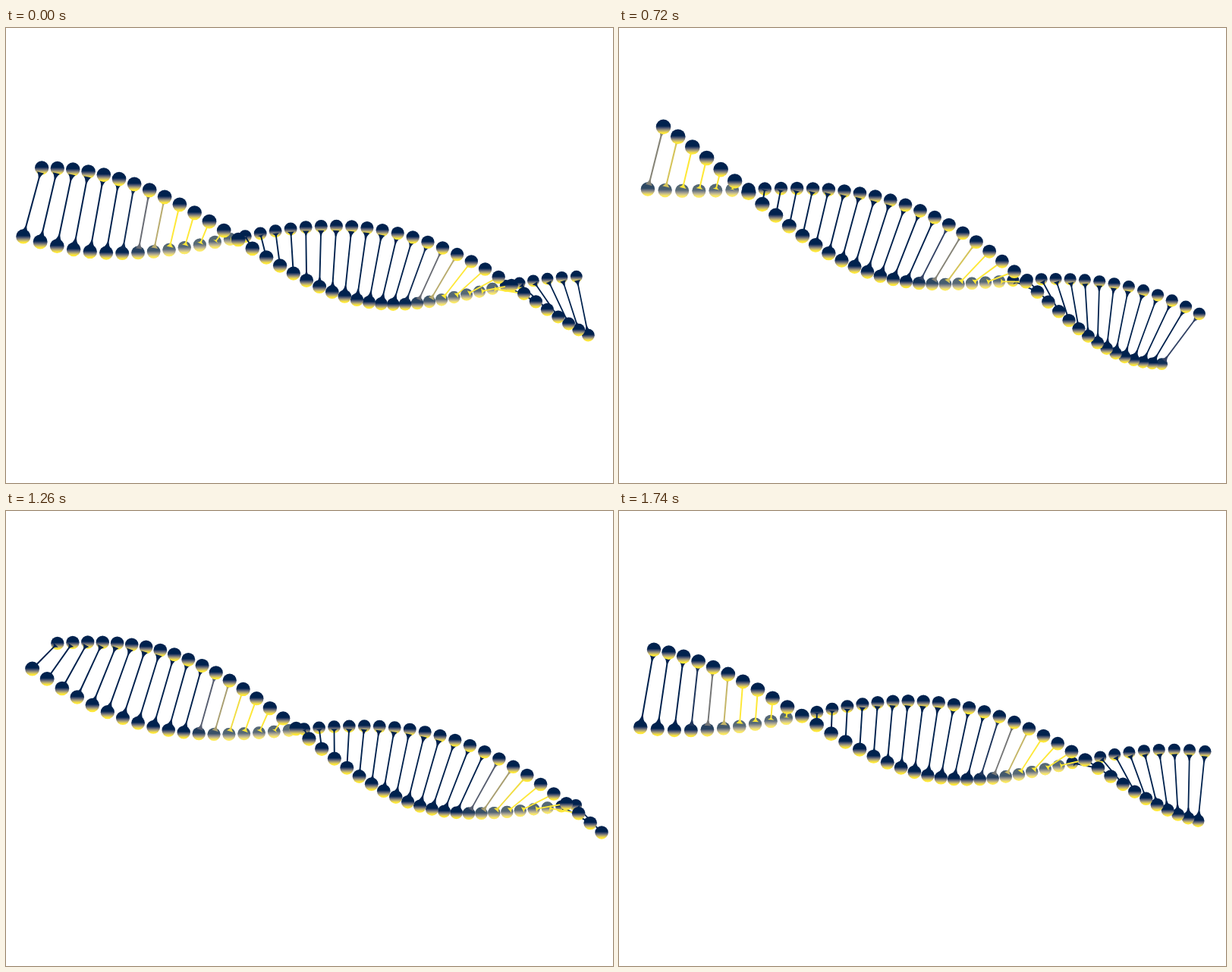
Animation of 800x600 px, one loop 1800 ms. Source, as an HTML page:

```html
<!DOCTYPE html>
<html lang="en">
<head>
<meta charset="utf-8">
<title>Double helix</title>
<style>
  html, body { margin: 0; width: 100%; height: 100%; overflow: hidden; background: #fff; }
  svg { display: block; width: 100vw; height: 100vh; }
</style>
</head>
<body>
<svg viewBox="0 0 800 600">
  <defs>
    <linearGradient id="ball" x1="0.5" y1="0" x2="0.5" y2="1">
      <stop offset="0.44" stop-color="#00224e"/>
      <stop offset="0.55" stop-color="#414d6b"/>
      <stop offset="0.66" stop-color="#83817a"/>
      <stop offset="0.78" stop-color="#c8b86a"/>
      <stop offset="0.9" stop-color="#fee838"/>
    </linearGradient>
  </defs>
  <g id="helix"></g>
</svg>
<script>
const PAIRS = 40, TWIST = Math.PI / 20, SPACING = 19.28, RADIUS = 49, BALL = 8.7;
const FOCAL = 1048, CENTER = { x: 23.5, y: 2 };
const LOOP = 1800, TICK = 60, TURN_STEPS = 38;
const RAMP = [[0, 34, 78], [65, 77, 107], [125, 124, 120], [190, 176, 110], [254, 232, 56]];
const helix = document.getElementById('helix');
const rad = deg => deg * Math.PI / 180;
const fix = n => n.toFixed(2);
const clamp = v => Math.min(1, Math.max(0, v));

function rampColor(v) {
  const p = v * (RAMP.length - 1);
  const i = Math.min(RAMP.length - 2, Math.floor(p));
  return `rgb(${RAMP[i].map((c, j) => Math.round(c + (RAMP[i + 1][j] - c) * (p - i)))})`;
}

function project(p) {
  const scale = FOCAL / (FOCAL + p[2]);
  return { x: 400 + p[0] * scale, y: 300 + p[1] * scale, z: p[2], scale };
}

// 0 where the visible side of the rod faces up, 1 where it faces down.
function rodShade(angle) {
  const facing = -Math.cos(angle) * Math.sign(Math.sin(angle));
  return clamp((facing - 0.42) / 0.38);
}

// A thin rod that flares out where it meets each ball.
function rodPath(a, b) {
  const dx = b.x - a.x, dy = b.y - a.y, len = Math.hypot(dx, dy) || 1;
  const at = (f, w) => `${fix(a.x + dx * f - dy / len * w)} ${fix(a.y + dy * f + dx / len * w)}`;
  const base = 0.75 * BALL / (2 * RADIUS), neck = 1.8 * BALL / (2 * RADIUS), mid = (base + neck) / 2;
  const thinA = 0.95 * a.scale, thinB = 0.95 * b.scale, wideA = 4.5 * a.scale, wideB = 4.5 * b.scale;
  return `M${at(base, wideA)}Q${at(mid, thinA)} ${at(neck, thinA)}` +
    `L${at(1 - neck, thinB)}Q${at(1 - mid, thinB)} ${at(1 - base, wideB)}` +
    `L${at(1 - base, -wideB)}Q${at(1 - mid, -thinB)} ${at(1 - neck, -thinB)}` +
    `L${at(neck, -thinA)}Q${at(mid, -thinA)} ${at(base, -wideA)}Z`;
}

// Balls behind a lit rod are washed out by "glow".
function ball(p, glow) {
  const circle = (fill, opacity) =>
    `<circle cx="${fix(p.x)}" cy="${fix(p.y)}" r="${fix(BALL * p.scale)}" fill="${fill}" opacity="${fix(opacity)}"/>`;
  return { z: p.z, svg: circle('url(#ball)', 1) + (glow ? circle('#f6efc0', glow) : '') };
}

function draw(step) {
  const turn = 360 / TURN_STEPS * step;
  // The axis wobbles on a cone while the helix spins.
  const yaw = 0.178 + 0.085 * Math.cos(rad(turn - 73));
  const roll = 0.26 + 0.086 * Math.sin(rad(turn - 59));
  const cy = Math.cos(yaw), sy = Math.sin(yaw), cr = Math.cos(roll), sr = Math.sin(roll);
  const axis = [cy * cr, cy * sr, sy];
  const front = [sy * cr, sy * sr, -cy];
  const down = [-sr, cr, 0];
  const parts = [];
  for (let i = 0; i < PAIRS; i++) {
    const along = (i - (PAIRS - 1) / 2) * SPACING;
    const angle = (i - 13.08) * TWIST - rad(turn);
    const end = side => project([CENTER.x, CENTER.y, 0].map((c, j) => c + along * axis[j] +
      side * RADIUS * (Math.cos(angle) * front[j] + Math.sin(angle) * down[j])));
    const [near, far] = [end(1), end(-1)].sort((m, n) => m.z - n.z);
    const shade = rodShade(angle);
    parts.push(ball(near, 0), ball(far, 0.35 * shade), {
      z: (near.z + far.z) / 2,
      svg: `<path d="${rodPath(near, far)}" fill="${rampColor(shade)}"/>`
    });
  }
  helix.innerHTML = parts.sort((m, n) => n.z - m.z).map(part => part.svg).join('');
}

// The spin runs one step per tick, then one and two steps by turns.
function stepAt(tick) {
  return tick + Math.max(0, Math.floor((tick - 16) / 2));
}

let shown = -1;
function animate() {
  const tick = Math.floor(performance.now() % LOOP / TICK);
  if (tick !== shown) draw(stepAt(shown = tick));
  requestAnimationFrame(animate);
}
animate();
</script>
</body>
</html>
```
